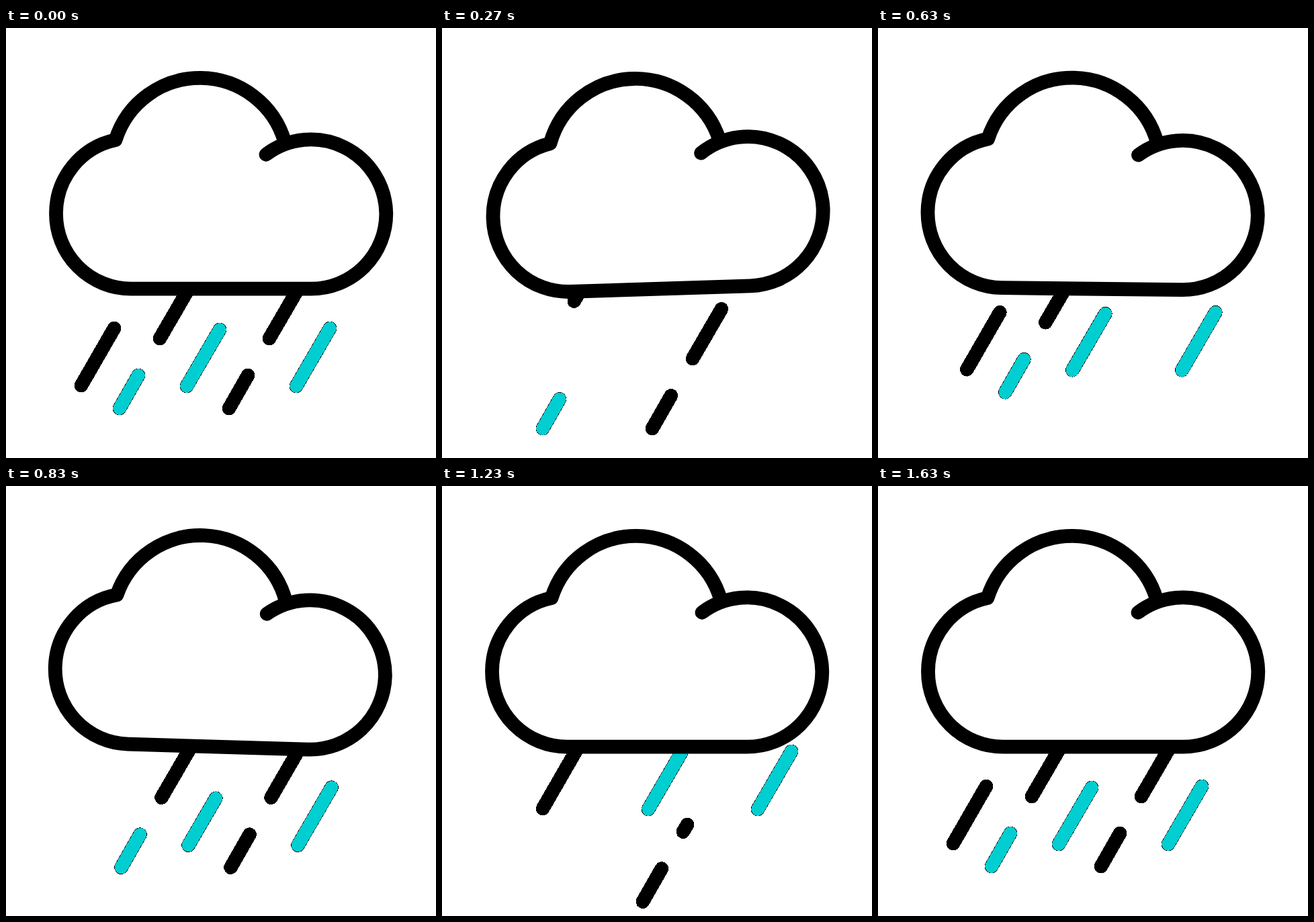
Animation, 640 px wide and 640 px high, one loop 1.67 s. Source, as an HTML page:

```html
<!DOCTYPE html>
<html lang="en">
<head>
<meta charset="utf-8">
<title>Rain cloud</title>
<style>
  html, body { margin: 0; width: 100%; height: 100%; overflow: hidden; background: #fff; }
  svg { display: block; width: 100%; height: 100%; }
  path, line { stroke-linecap: round; stroke-linejoin: round; }
  line { shape-rendering: crispEdges; }
</style>
</head>
<body>
<svg viewBox="0 0 640 640">
  <g id="rain"></g>
  <path id="cloud" fill="#fff" stroke="#000" stroke-width="20.8"
    d="M387 188.3A111.8 111.8 0 0 1 565.8 276.2A111.8 111.8 0 0 1 454 388.2H186A111.8 111.8 0 0 1 74.5 276.2A111.8 111.8 0 0 1 163 166.7A131.5 131.5 0 0 1 415 170"/>
</svg>
<script>
const LOOP = 1670, STEP = 100 / 3, LAST = 49, TRIM = 5;
const TEAL = '#00ced1', BLACK = '#000';
const rain = document.getElementById('rain');
const cloud = document.getElementById('cloud');

// line: x1, y1, x2, y2; grow and shrink: start step in each of the three waves
const drops = [
  { line: [161, 447, 112, 532], color: BLACK, grow: [-9, 6, 31],  shrink: [0, 19, 99] },
  { line: [272, 388, 229, 462], color: BLACK, grow: [-9, 13, 37], shrink: [2, 26, 99] },
  { line: [318, 449, 269, 533], color: TEAL,  grow: [-9, 8, 32],  shrink: [1, 23.7, 99] },
  { line: [482, 447, 432, 533], color: TEAL,  grow: [-9, 8, 32],  shrink: [2, 26, 99] },
  { line: [197, 517, 169, 566], color: TEAL,  grow: [-9, 13, 37], shrink: [7, 28, 99] },
  { line: [435, 388, 392, 462], color: BLACK, grow: [-9, 19, 43], shrink: [12, 33.2, 99] },
  { line: [360, 517, 332, 566], color: BLACK, grow: [-9, 19, 43], shrink: [14, 38, 99] }
];

// Each wave drifts at a steady rate until it reaches the ground
const waves = [
  { at: 0,  x: 0,   y: 0,   vx: -2.38, vy: 3.77 },
  { at: 25, x: 2.5, y: 1.7, vx: -2.97, vy: 4.24 },
  { at: 49, x: 0,   y: 0,   vx: -3.17, vy: 4.33 }
];
const GROUND = 53;

const swing = [[0, 0], [5, 0], [12, -4.7], [22, 2.1], [33, 0], [50, 0]];

const clamp = v => Math.min(1, Math.max(0, v));
const smooth = v => { v = clamp(v); return v * v * (3 - 2 * v); };

function swingAngle(f) {
  const i = swing.findIndex(key => key[0] > f);
  const [f0, a0] = swing[i - 1], [f1, a1] = swing[i];
  return a0 + (a1 - a0) * smooth((f - f0) / (f1 - f0));
}

function waveOffset({ at, x, y, vx, vy }, f) {
  const n = Math.min(f - at, (GROUND - y) / vy);
  return [x + vx * n, y + vy * n];
}

function addLine(color, width) {
  const el = document.createElementNS('http://www.w3.org/2000/svg', 'line');
  el.setAttribute('stroke', color);
  el.setAttribute('stroke-width', width);
  return rain.appendChild(el);
}

// Teal strokes sit on a slightly wider black one, giving a hairline edge
for (const drop of drops) {
  drop.strokes = waves.map(() => drop.color === TEAL
    ? [addLine(BLACK, 20.6), addLine(TEAL, 19.4)]
    : [addLine(BLACK, 20.6)]);
}

function drawDrop(drop, wave, f) {
  const start = smooth((f - drop.shrink[wave]) / TRIM);
  const end = smooth((f - drop.grow[wave]) / TRIM);
  const [dx, dy] = waveOffset(waves[wave], f);
  const [x1, y1, x2, y2] = drop.line;
  const pos = { x1: start, y1: start, x2: end, y2: end };
  for (const el of drop.strokes[wave]) {
    el.style.display = end > start ? '' : 'none';
    for (const name in pos) {
      const value = name[0] === 'x' ? x1 + (x2 - x1) * pos[name] + dx
                                    : y1 + (y2 - y1) * pos[name] + dy;
      el.setAttribute(name, value);
    }
  }
}

function draw(now) {
  const f = Math.min(LAST, Math.floor((now % LOOP + 4) / STEP));
  cloud.setAttribute('transform', `rotate(${swingAngle(f)} 320 231)`);
  for (const drop of drops) waves.forEach((_, i) => drawDrop(drop, i, f));
}

const begin = performance.now();
function tick() {
  draw(performance.now() - begin);
  requestAnimationFrame(tick);
}
tick();
</script>
</body>
</html>
```
